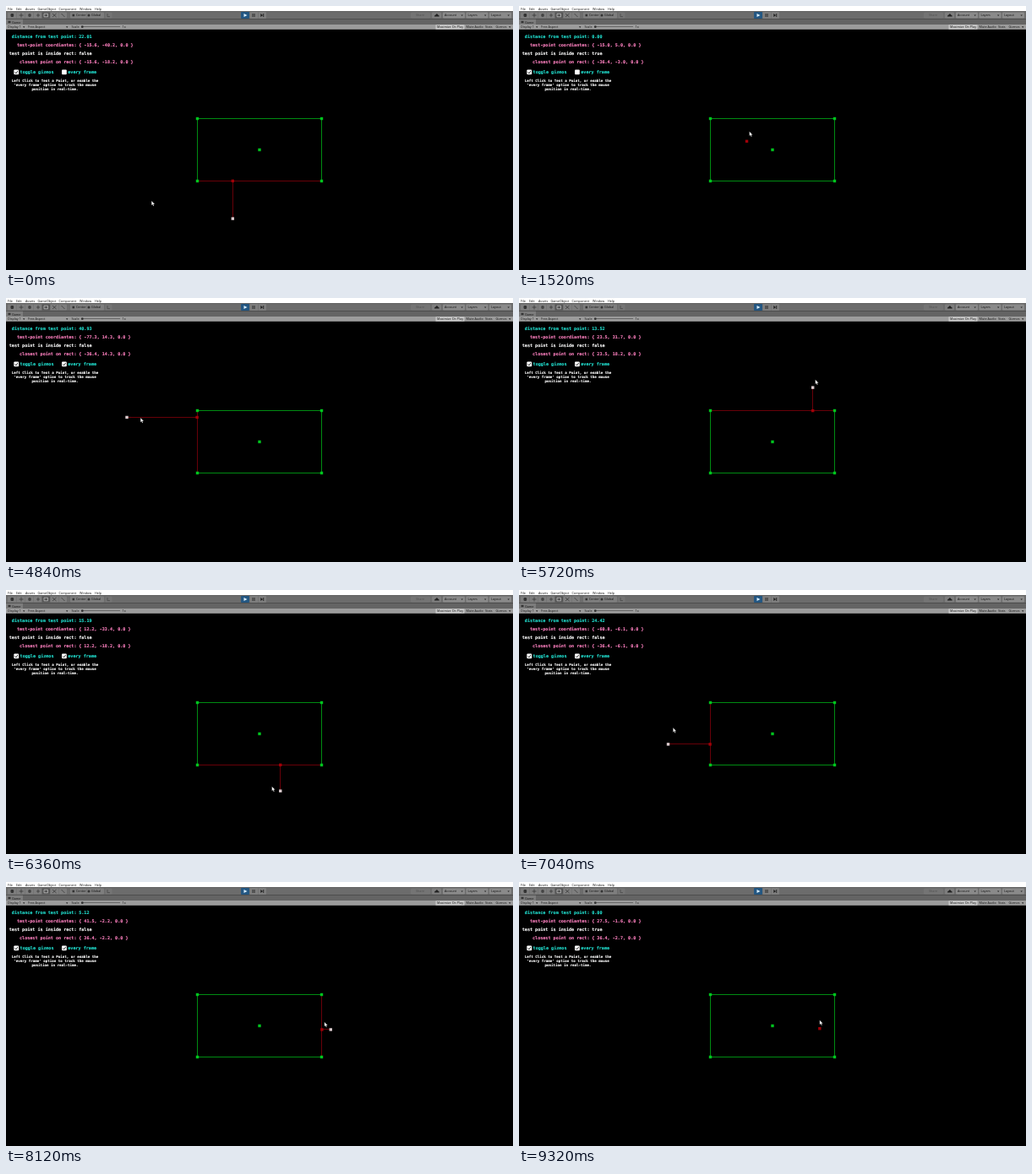
An HTML page for the animation above (9360 ms loop, 600 px wide and 313 px high).

```html
<!DOCTYPE html>
<html lang="en">
<head>
<meta charset="utf-8">
<title>Closest point on rect</title>
<style>
  html, body { margin: 0; width: 100%; height: 100%; overflow: hidden; background: #000; }
  svg { display: block; width: 100%; height: 100%; }
  .ui { font: 3.75px "Open Sans", Roboto, sans-serif; fill: currentColor; }
  .hud {
    font: bold 5.1px "DejaVu Sans Mono", monospace;
    fill: currentColor; stroke: currentColor; stroke-width: 0.12;
  }
  .help { font-size: 4.18px; text-anchor: middle; }
  .end { text-anchor: end; }
</style>
</head>
<body>
<svg id="stage" viewBox="0 0 600 313" preserveAspectRatio="none"></svg>
<script>
const LOOP = 9360, STEP = 40;
const CX = 300, CY = 170.5, UNIT = 2.03, HX = 36.4, HY = 18.18;
const CYAN = '#22e2d2', PINK = '#ff80c0', GREEN = '#00c41e', SIDE = '#008c12';
const RED = '#a00008', HIT = '#680008', WHITE = '#dccccf';

// Until the box is ticked the point moves only on clicks
const TICK_TIME = 3400, CLICKS = [700, 1520, 2400], START = [-15.6, -40.19];

// Pointer way points: time, then world x and y
const PATH = [
  [0, -63, -35], [700, -52, -3], [1520, -15, 5], [2400, 13, 40.81], [2720, 13, 40.81],
  [3160, -117, 36], [3600, -114, 40], [4100, -49, 25], [4600, -107, 33],
  [4840, -77.33, 14.3], [5060, -15, -15], [5280, 85, 2], [5720, 23.5, 31.7],
  [6000, 50, 20], [6420, 5, -36], [7040, -60.82, -6.1], [7280, 0, 30],
  [7560, 100, 8], [8120, 41.52, -2.2], [8600, 5, -7], [9320, 27.5, -1.6]
];

const stage = document.getElementById('stage');

function set(el, attrs) {
  for (const k in attrs) el.setAttribute(k, attrs[k]);
}
function add(tag, attrs, text) {
  const el = document.createElementNS(stage.namespaceURI, tag);
  set(el, attrs);
  if (text) el.textContent = text;
  return stage.appendChild(el);
}
const box = (x, y, width, height, fill, rx = 0) => add('rect', { x, y, width, height, fill, rx });
const label = (x, y, text, cls = 'ui', color = '#111') => add('text', { x, y, class: cls, color }, text);
const shape = (d, stroke, fill = 'none', width = 0.7) => add('path', { d, stroke, fill, 'stroke-width': width });
const line = (x1, y1, x2, y2, stroke) =>
  add('line', { x1, y1, x2, y2, stroke, 'stroke-width': 1, 'shape-rendering': 'crispEdges' });
const disc = (cx, cy, r, fill) => add('circle', { cx, cy, r, fill });
const arrow = (x, y) => shape(`M${x} ${y}h2.4l-1.2 1.6z`, 'none', '#222');

function drawEditor() {
  box(0, 0, 600, 6.2, '#fff');
  [[2, 'File'], [12, 'Edit'], [23, 'Assets'], [37.5, 'GameObject'], [62.5, 'Component'],
   [87, 'Window'], [105, 'Help']].forEach(([x, s]) => label(x, 4.5, s));

  box(0, 6.2, 600, 9.3, '#6c6c6c');
  box(2, 7.5, 70, 7, '#7e7e7e', 1);
  box(42.5, 7.5, 9.5, 7, '#555', 0.5);
  for (let x = 12.5; x < 70; x += 10) box(x, 7.5, 0.4, 7, '#666');
  box(5.5, 9, 3.6, 4, '#333', 1.2);
  shape('M15.5 11h5M18 8.5v5M38 13.2v-4.4M36 11h4M55 9l4.5 4M55 13l4.5 -4M65.5 9l4 4', '#333');
  disc(28, 11, 1.9, '#444');
  shape('M45 9.2h4.5v3.6h-4.5z', '#ccc');
  box(76, 7.5, 40, 7, '#7e7e7e', 1);
  box(95.7, 7.5, 0.4, 7, '#666');
  box(78.5, 9.7, 2.6, 2.6, '#333');
  disc(98, 11, 1.5, '#333');
  label(83, 12.4, 'Center');
  label(101, 12.4, 'Global');
  box(117.5, 7.5, 8, 7, '#747474', 1);
  shape('M120 9v3.6h3', '#444');

  box(278, 7, 10, 8, '#245782', 1);
  shape('M281.5 9l4 2 -4 2z', 'none', '#d8efff');
  box(288.4, 7, 19.6, 8, '#7e7e7e', 1);
  box(298, 7, 0.4, 8, '#666');
  shape('M292 9v4M294 9v4M304.7 9v4', '#222', 'none', 0.9);
  shape('M301.3 9l2.8 2 -2.8 2z', 'none', '#222');

  box(479, 7.5, 23, 7, '#747474', 1);
  label(485, 12.4, 'Share', 'ui', '#505050');
  box(504, 7.5, 11, 7, '#7e7e7e', 1);
  shape('M507 12.5q0 -2 1.5 -2q1.5 -2.5 2.7 0q1.8 .2 1.4 2z', 'none', '#222');
  ['Account', 'Layers', 'Layout'].forEach((s, i) => {
    const x = 517 + i * 27.5;
    box(x, 7.5, 26, 7, '#8a8a8a', 1);
    label(x + 2, 12.4, s);
    arrow(x + 21.5, 10.4);
  });

  box(0, 15.5, 600, 6.5, '#646464');
  box(0, 15.8, 20, 6.2, '#7c7c7c');
  box(2.5, 17.8, 3, 2.4, '#333');
  label(7, 20.5, 'Game');
  box(0, 22, 600, 5.8, '#9c9c9c');
  box(508.5, 22.2, 34, 5.4, '#c8c8c8');
  [[2, 'Display 1'], [26, 'Free Aspect'], [77.5, 'Scale'], [137.5, '1x'], [510, 'Maximize On Play'],
   [544.5, 'Mute Audio'], [567, 'Stats'], [579.5, 'Gizmos']].forEach(([x, s]) => label(x, 26.3, s));
  [20, 71, 595].forEach(x => arrow(x, 24.3));
  line(89, 24.5, 135, 24.5, '#666');
  disc(90.3, 24.7, 1.4, '#333');
}

function drawHud() {
  const rows = [['distance from test point:', CYAN], ['test-point coordiantes:', PINK],
    ['test point is inside rect:', '#fff'], ['closest point on rect:', PINK]];
  const values = rows.map(([s, color], i) => {
    const y = 38 + i * 10;
    label(83.5, y, s, 'hud end', color);
    return label(86.2, y, '', 'hud', color);
  });
  const ticks = [[9.3, 'toggle gizmos'], [66, 'every frame']].map(([x, s]) => {
    box(x, 75.5, 5.8, 5.8, '#fff', 1);
    label(x + 7.3, 80, s, 'hud', CYAN);
    return shape(`M${x + 1.3} 78.4l1.3 1.5 2.1 -3`, '#222', 'none', 0.9);
  });
  ['Left Click to Test a Point, or enable the', "'every frame' option to track the mouse",
   'position in real-time.'].forEach((s, i) => label(58, 89.7 + i * 5.2, s, 'hud help', '#fff'));
  return { values, everyFrame: ticks[1] };
}

const toX = x => CX + x * UNIT, toY = y => CY - y * UNIT;
const snap = v => Math.floor(v) + 0.5;
const clamp = (v, h) => Math.max(-h, Math.min(h, v));
const inside = ([x, y]) => Math.abs(x) <= HX && Math.abs(y) <= HY;
const fmt = ([x, y]) => `{ ${x.toFixed(1)}, ${y.toFixed(1)}, 0.0 }`;

const slope = (i, k) => (PATH[i + 1][k] - PATH[i][k]) / (PATH[i + 1][0] - PATH[i][0]);

// Monotone tangent, so the pointer never overshoots a way point
function tangent(i, k) {
  if (i === 0 || i === PATH.length - 1) return 0;
  const a = slope(i - 1, k), b = slope(i, k);
  return a * b <= 0 ? 0 : 2 * a * b / (a + b);
}

function pointer(t) {
  let i = 0;
  while (i < PATH.length - 2 && PATH[i + 1][0] <= t) i++;
  const dt = PATH[i + 1][0] - PATH[i][0], u = Math.min(1, (t - PATH[i][0]) / dt), v = 1 - u;
  return [1, 2].map(k => PATH[i][k] * v * v * (1 + 2 * u) + PATH[i + 1][k] * u * u * (3 - 2 * u)
    + dt * u * v * (tangent(i, k) * v - tangent(i + 1, k) * u));
}

function testPoint(t) {
  if (t >= TICK_TIME) return pointer(t);
  const clicks = CLICKS.filter(c => c <= t);
  return clicks.length ? pointer(clicks.pop()) : START;
}

// While the point is inside, the last outside result stays on show
function closestPoint(t) {
  while (t > 0 && inside(testPoint(t))) t -= STEP;
  const [x, y] = testPoint(t);
  return [clamp(x, HX), clamp(y, HY)];
}

function nearestSide([x, y]) {
  if (inside([x, y])) return '';
  return Math.abs(x) - HX > Math.abs(y) - HY ? (x < 0 ? 'left' : 'right') : (y > 0 ? 'top' : 'bottom');
}

drawEditor();
const hud = drawHud();
const L = snap(toX(-HX)), R = snap(toX(HX)), T = snap(toY(HY)), B = snap(toY(-HY));
const sides = {
  left: line(L, T, L, B), right: line(R, T, R, B),
  top: line(L, T, R, T), bottom: line(L, B, R, B)
};
const link = line(0, 0, 0, 0, HIT);
const SIZE = 3.4;
const marker = (x, y, fill) => box(x - SIZE / 2, y - SIZE / 2, SIZE, SIZE, fill);
const place = (el, x, y, attrs) => set(el, { x: x - SIZE / 2, y: y - SIZE / 2, ...attrs });
[[L, T], [R, T], [L, B], [R, B], [CX, CY]].forEach(([x, y]) => marker(x, y, GREEN));
const near = marker(0, 0, RED), dot = marker(0, 0, WHITE);
const cursor = shape('M0 0v5.3l1.2 -1.1 .9 2 .9 -.4 -.9 -1.9h1.7z', '#222', '#fff', 0.25);

function draw(t) {
  const p = testPoint(t), c = closestPoint(t), isIn = inside(p);
  const px = toX(p[0]), py = toY(p[1]), cx = toX(c[0]), cy = toY(c[1]);
  const dist = isIn ? 0 : Math.hypot(p[0] - c[0], p[1] - c[1]);
  [dist.toFixed(2), fmt(p), String(isIn), fmt(c)].forEach((s, i) => { hud.values[i].textContent = s; });
  set(hud.everyFrame, { visibility: t >= TICK_TIME ? 'visible' : 'hidden' });

  const hit = nearestSide(p), visibility = isIn ? 'hidden' : 'visible';
  for (const k in sides) set(sides[k], { stroke: k === hit ? HIT : SIDE });
  set(link, { x1: snap(px), y1: snap(py), x2: snap(cx), y2: snap(cy), visibility });
  place(near, cx, cy, { visibility });
  place(dot, px, py, { fill: isIn ? RED : WHITE });

  // The point trails the cursor by one step
  const m = pointer(t + STEP);
  set(cursor, { transform: `translate(${toX(m[0])} ${toY(m[1]) - 10})` });
}

const begin = performance.now();
function tick() {
  const t = (performance.now() - begin) % LOOP;
  draw(Math.floor(t / STEP) * STEP);
  requestAnimationFrame(tick);
}
tick();
</script>
</body>
</html>
```
